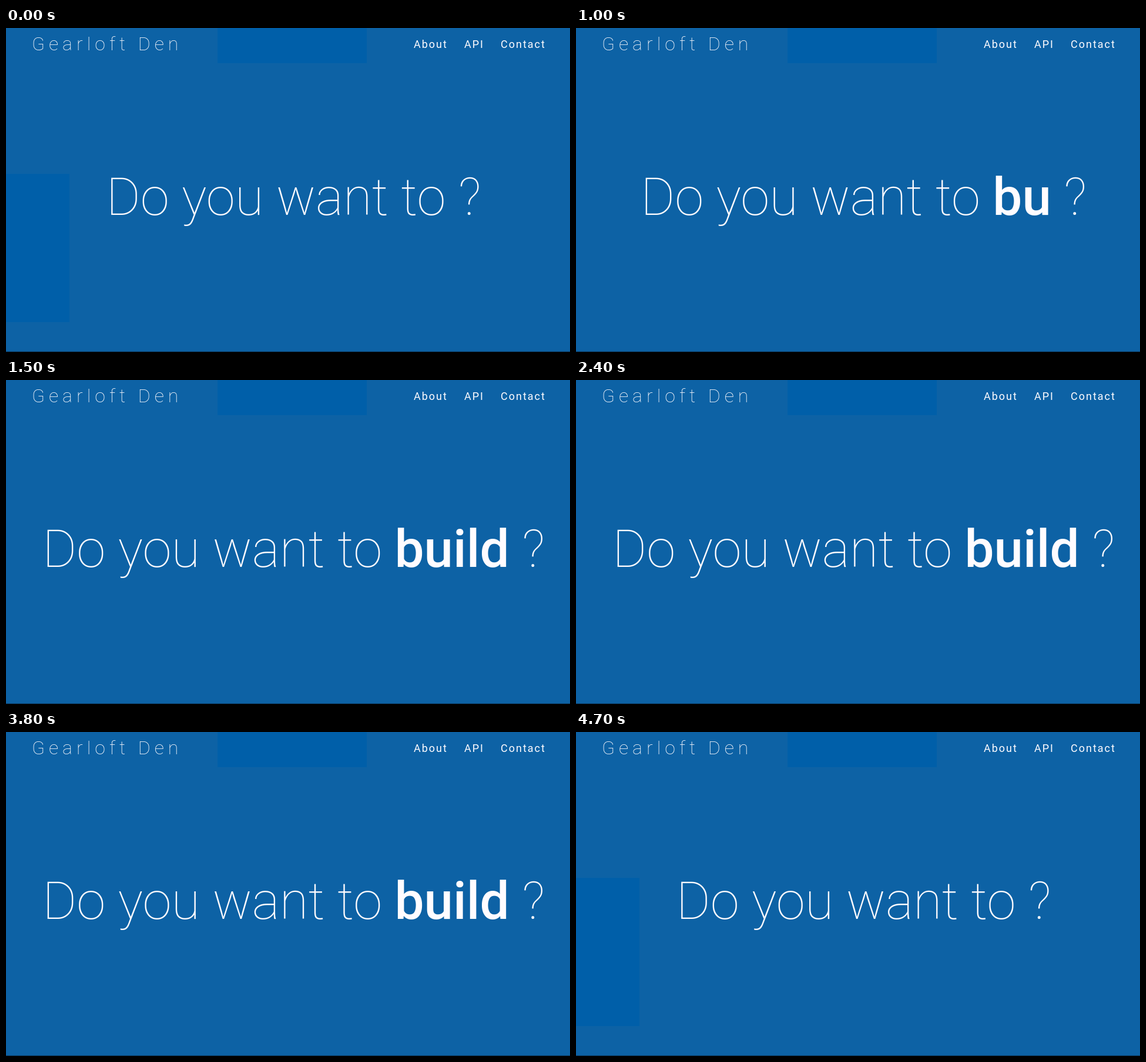
These frames come from a looping animation (960 px wide and 553 px high, 5.1 s). An HTML page with a canvas:

```html
<!DOCTYPE html>
<html lang="en">
<head>
<meta charset="utf-8">
<title>Typed heading</title>
<style>
html, body { margin: 0; width: 100%; height: 100%; overflow: hidden; background: #0d62a5; }
canvas { display: block; }
</style>
</head>
<body>
<canvas id="stage" width="960" height="553"></canvas>
<script>
const ctx = document.getElementById('stage').getContext('2d');
const LOOP = 5100, TYPE_AT = 900, TYPE_STEP = 100, SELECT_AT = 3900, CLEAR_AT = 4400;
const WORD = 'build', CENTER = 489.5, BASE = 319;
const BLUE = '#0d62a5', PATCH = '#005fa9', WHITE = '#fffcff';
const THIN = '100 89px Roboto, sans-serif', BOLD = '500 89px Roboto, sans-serif';

function rect(color, x, y, w, h) {
  ctx.fillStyle = color;
  ctx.fillRect(x, y, w, h);
}

// Draws a run of text and returns its advance.
function text(str, x, y, font, color = WHITE, spacing = 0) {
  ctx.font = font;
  ctx.letterSpacing = spacing + 'px';
  ctx.fillStyle = color;
  ctx.fillText(str, x, y);
  return ctx.measureText(str).width;
}

function width(str, font) {
  ctx.font = font;
  ctx.letterSpacing = '0px';
  return ctx.measureText(str).width;
}

function header() {
  rect(PATCH, 360, 0, 254, 60);
  text('Gearloft Den', 44, 38, '100 32px Roboto, sans-serif', WHITE, 7);
  const nav = '400 18px Roboto, sans-serif';
  text('About', 694, 34, nav, WHITE, 2);
  text('API', 780, 34, nav, WHITE, 2);
  text('Contact', 842, 34, nav, WHITE, 2);
}

function heading(t) {
  const count = t < CLEAR_AT ? Math.floor((t - TYPE_AT) / TYPE_STEP) + 1 : 0;
  const word = WORD.slice(0, Math.max(0, count));
  const selected = word && t >= SELECT_AT;
  const lead = 'Do you want to ', tail = word ? ' ?' : '?';
  const wordWidth = width(word, BOLD);
  let x = CENTER - (width(lead, THIN) + wordWidth + width(tail, THIN)) / 2;

  x += text(lead, x, BASE, THIN);
  if (selected) rect(WHITE, Math.round(x), 236, Math.round(wordWidth + width(' ', THIN)), 104);
  x += text(word, x, BASE, BOLD, selected ? BLUE : WHITE);
  text(tail, x, BASE, THIN);
  return word;
}

function draw(t) {
  rect(BLUE, 0, 0, 960, 553);
  if (t < TYPE_AT || t >= CLEAR_AT) rect(PATCH, 0, 249, 108, 253);
  header();
  heading(t);
  rect('#0a3558', 0, 552, 960, 1);
}

function tick() {
  draw(performance.now() % LOOP);
  requestAnimationFrame(tick);
}
tick();
</script>
</body>
</html>
```
